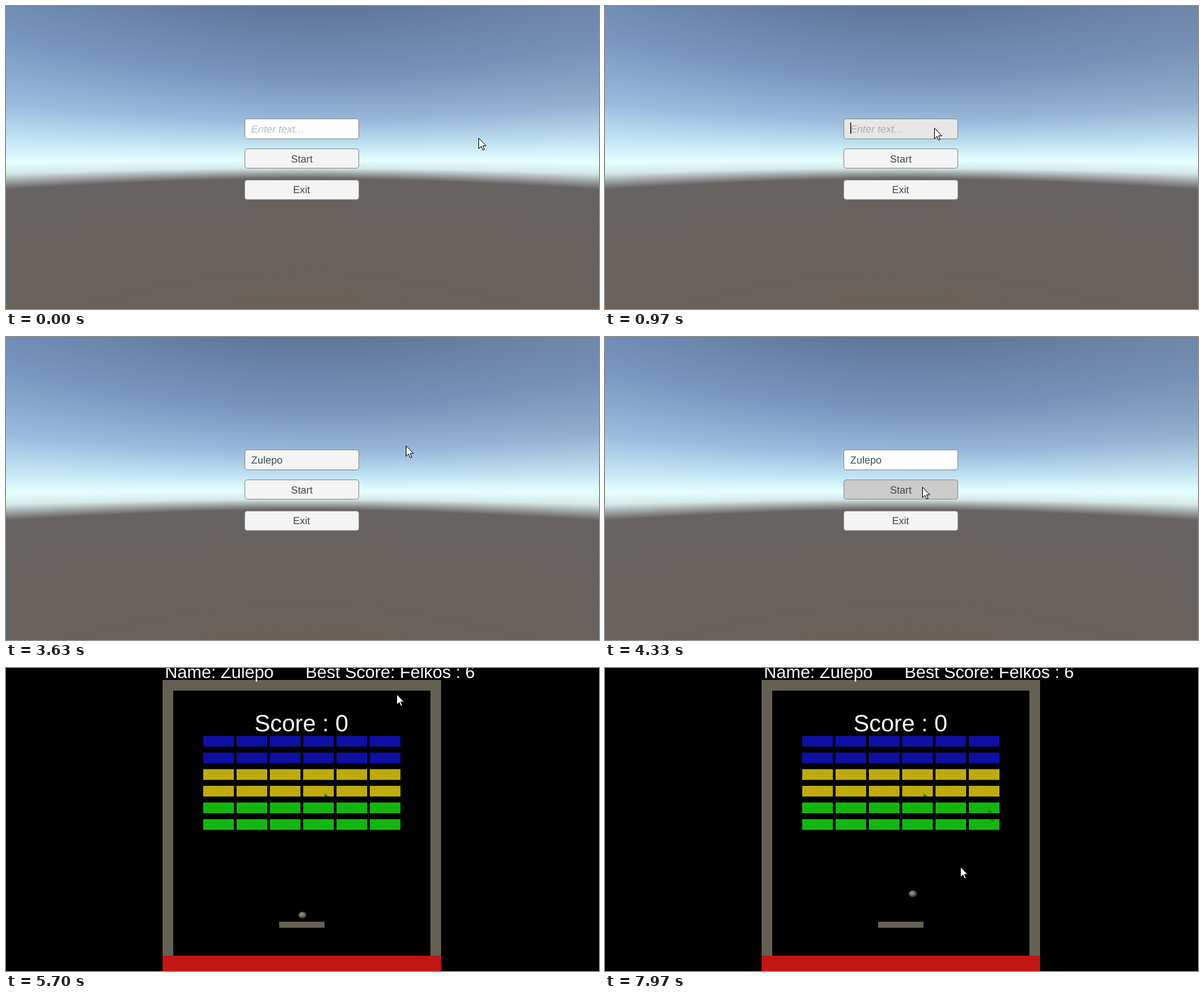
An HTML page with a canvas for the animation above (8 s loop, 890x455 px).

```html
<!DOCTYPE html>
<html lang="en">
<head>
<meta charset="utf-8">
<title>Brick game</title>
<style>
  html, body { margin: 0; width: 100%; height: 100%; overflow: hidden; background: #000; }
  canvas, svg { position: absolute; left: 0; top: 0; }
  text { font-family: "Liberation Sans", Arial, sans-serif; text-rendering: geometricPrecision; white-space: pre; }
  #menu text { font-size: 15.4px; fill: #434b4b; }
  #menu .box { stroke: #87908f; fill: #f4f4f4; }
  #game text { font-size: 26px; fill: #fff; }
</style>
</head>
<body>
<canvas id="sky" width="890" height="455"></canvas>
<svg width="890" height="455">
  <defs>
    <radialGradient id="shade" cx=".4" cy=".35" r=".7">
      <stop stop-color="#a09c96"/><stop offset=".5" stop-color="#6c6863"/><stop offset="1" stop-color="#242220"/>
    </radialGradient>
  </defs>
  <g id="menu">
    <rect class="box" id="field" x="358.5" y="169.5" width="171" height="30" rx="3.5"/>
    <rect class="box" id="start" x="358.5" y="214.5" width="171" height="29" rx="3.5"/>
    <rect class="box" x="358.5" y="261.5" width="171" height="29" rx="3.5" style="stroke:#a5a29f"/>
    <text id="hint" x="368" y="189.5" font-style="italic">Enter text...</text>
    <text id="entry" x="368" y="189.5"></text>
    <rect id="caret" y="175" width="1.4" height="17" fill="#222"/>
    <text x="444" y="235" text-anchor="middle">Start</text>
    <text x="443.5" y="281" text-anchor="middle">Exit</text>
  </g>
  <g id="game">
    <rect width="890" height="455"/>
    <path d="M235 432V18H653V432H637V34H251V432Z" fill="#646054"/>
    <path d="M235 432H653V455H235Z" fill="#c11611"/>
    <g id="bricks"></g>
    <path id="mark1" d="M478 188L484 193H478Z" fill="#1f8a12"/>
    <path id="mark2" d="M575 211L583 218H575ZM576 227H583L585 231H581Z" fill="#12920f"/>
    <path d="M410 381H478V390H410Z" fill="#646054"/>
    <ellipse id="ball" rx="6" ry="5" fill="url(#shade)"/>
    <text id="player" x="238.5" y="15"></text>
    <text x="449.5" y="15">Best Score: Felkos : 6</text>
    <text x="443.5" y="94.5" text-anchor="middle" style="font-size:35.2px">Score : 0</text>
  </g>
  <path id="cursor" d="M.5 .5V16.2L4.2 12.8L6.7 18.4L9 17.4L6.6 11.9H11.5Z" fill="#fff" stroke="#000"/>
</svg>
<script>
const LOOP = 8000, STEP = 70, NAME = "Zulepo";
const $ = id => document.getElementById(id);
const set = (id, attrs) => { for (const k in attrs) $(id).setAttribute(k, attrs[k]); };
const show = (id, on) => { $(id).style.display = on ? "" : "none"; };
const clamp = v => Math.max(0, Math.min(1, v));
const mix = (a, b, p) => a + (b - a) * p;

// Colour depends on elevation, so each column stretches the same gradient about the eye line.
function paintSky() {
  const ctx = $("sky").getContext("2d"), eye = 227.5, focal = 394;
  const stops = [[0, "#5e769b"], [.24, "#7996c0"], [.38, "#9bbadd"], [.46, "#c2e4f4"], [.51, "#e6ffff"],
    [.535, "#d6e8e8"], [.552, "#a0a6a6"], [.57, "#676361"], [1, "#6a615a"]];
  for (let x = 0; x < 890; x++) {
    const reach = eye * Math.hypot(1, (x - 444.5) / focal);
    const g = ctx.createLinearGradient(0, eye - reach, 0, eye + reach);
    for (const [offset, color] of stops) g.addColorStop(offset, color);
    ctx.fillStyle = g;
    ctx.fillRect(x, 0, 1, 455);
    // The sky greys towards the right, away from the light.
    const veil = ctx.createLinearGradient(0, 0, 0, 225);
    veil.addColorStop(.5, `rgba(95,110,125,${0.2 * clamp((x - 300) / 590)})`);
    veil.addColorStop(1, "rgba(95,110,125,0)");
    ctx.fillStyle = veil;
    ctx.fillRect(x, 0, 1, 225);
  }
}

function layBricks() {
  const colors = ["#0f0fa4", "#bfab0c", "#11b70f"];
  let out = "";
  for (let i = 0; i < 36; i++) {
    const row = Math.floor(i / 6);
    out += `<rect x="${296 + i % 6 * 50}" y="${102 + row * 25}" width="46" height="16" fill="${colors[row >> 1]}"/>`;
  }
  $("bricks").innerHTML = out;
}

function progress(t, from, steps) {
  return t < from ? 0 : clamp((Math.floor((t - from) / STEP) + 1) / steps);
}

// Curved mouse strokes: start time, step count, bend and end point.
const strokes = [
  [70, 12, [600, 222], [494, 190]],
  [900, 1, [494, 187], [494, 183]],
  [1040, 2, [540, 150], [580, 121]],
  [3560, 8, [662, 165], [476, 225]],
  [4730, 8, [474, 150], [353, 20]],
  [5490, 12, [622, 53], [679, 28]],
  [6320, 12, [768, -48], [554, 259]],
  [7150, 5, [501, 290], [533, 298]]
];

function pointer(t) {
  let pos = [709, 198];
  for (const [from, steps, bend, end] of strokes) {
    const p = 1 - (1 - progress(t, from, steps)) ** 2;
    pos = pos.map((v, k) => mix(mix(v, bend[k], p), mix(bend[k], end[k], p), p));
  }
  return pos;
}

// Grey level that fades to each new state in a tenth of a second.
function tint(t, base, states) {
  const level = states.reduce((now, [from, next]) => mix(now, next, clamp((t - from) / 100)), base);
  return `fill:rgb(${level},${level},${level})`;
}

const keyTimes = [1840, 1970, 2500, 2630, 2830, 3030];

function drawMenu(t) {
  const pressed = keyTimes.filter(k => t >= k), typed = NAME.slice(0, pressed.length);
  $("entry").textContent = typed;
  show("hint", !typed);
  $("hint").style.fill = t < 690 ? "#a9bfc3" : "#adadad";
  set("caret", { x: 368 + (typed ? $("entry").getComputedTextLength() : 0) });
  const lastInput = pressed.pop() ?? 900;
  show("caret", t >= 900 && t - lastInput < 540);
  set("field", { style: tint(t, 255, [[690, 245], [930, 210], [1040, 244], [4190, 255]]) });
  set("start", { style: tint(t, 244, [[3910, 240], [4190, 203]]) });
}

function drawGame(t) {
  const p = progress(t, 7760, 4);
  set("ball", { cx: mix(445, 462, p), cy: mix(371.3, 339.3, p) });
  show("mark1", t >= 4870);
  show("mark2", t >= 6950);
}

function draw(t) {
  const playing = t >= 4400, [x, y] = pointer(t).map(Math.round);
  set("cursor", { transform: `translate(${x} ${y})` });
  show("game", playing);
  (playing ? drawGame : drawMenu)(t);
}

paintSky();
layBricks();
$("player").textContent = "Name: " + NAME;
let begin;
function tick(now) {
  begin ??= now;
  draw((now - begin) % LOOP);
  requestAnimationFrame(tick);
}
draw(0);
requestAnimationFrame(tick);
</script>
</body>
</html>
```
